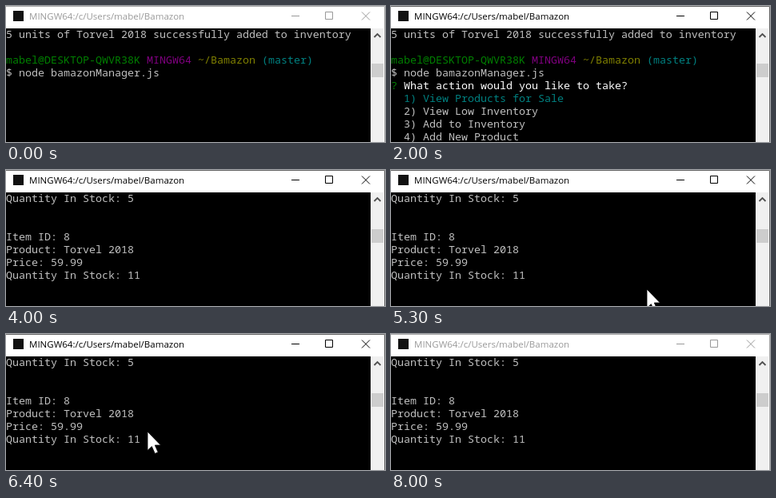
Recreate the animation shown at these times as an HTML page. Size 474x170 px, loop 8200 ms.

```html
<!DOCTYPE html>
<html lang="en">
<head>
<meta charset="utf-8">
<style>
  html, body { margin: 0; width: 100%; height: 100%; overflow: hidden; background: #000; }
  pre, svg { position: absolute; left: 0; top: 0; margin: 0; }
  pre { top: 27px; color: #c0c0c0; font: calc(40px / 3)/16px "Noto Sans Mono", monospace; }
  .green { color: #008000; }
  .purple { color: #800080; }
  .olive { color: #808000; }
  .cyan { color: #008080; }
  .white { color: #fff; }
</style>
</head>
<body>
<pre id="screen"></pre>
<svg width="474" height="170" viewBox="0 0 474 170">
  <rect id="caret" width="8" height="4" fill="#fff"/>
  <rect x="456" y="28" width="16" height="142" fill="#f0f0f0"/>
  <rect id="thumb" x="457" width="15" height="17" fill="#cdcdcd"/>
  <path d="M460.5 39l4-4 4 4" fill="none" stroke="#505050" stroke-width="1.8"/>
  <rect x="472" y="28" width="2" height="142" fill="#fff"/>
  <rect width="474" height="28" fill="#fff"/>
  <path id="border" d="M0 .5H473.5V170" fill="none"/>
  <rect x="9" y="6" width="13" height="13" fill="#111"/>
  <g id="title">
    <text x="29" y="17" font-family="Open Sans, sans-serif" font-size="11.5">MINGW64:/c/Users/mabel/Bamazon</text>
    <path d="M357 12.5h10M399.5 7.5h9v9h-9zM445 7.5l10 10M455 7.5l-10 10" fill="none" stroke="currentColor"/>
  </g>
  <path id="mouse" d="M0 0V23.5L5.3 18.6 9.3 27.5 13.2 25.8 9.3 17H16.5Z" fill="#fff" stroke="#000" stroke-width=".8"/>
</svg>
<script>
const LOOP = 8200;
const $ = id => document.getElementById(id);
const paint = (name, text) => `<span class="${name}">${text}</span>`;

const shell = [
  '5 units of Torvel 2018 successfully added to inventory',
  '',
  [paint('green', 'mabel@DESKTOP-QWVR38K'), paint('purple', 'MINGW64'),
   paint('olive', '~/Bamazon'), paint('cyan', '(master)')].join(' '),
  '$ node bamazonManager.js'
];
const question = paint('green', '?') + ' ' + paint('white', 'What action would you like to take?');
const choices = [
  paint('cyan', '  1) View Products for Sale'),
  '  2) View Low Inventory',
  '  3) Add to Inventory',
  '  4) Add New Product'
];
const products = [
  'Product: Lantern Nine Vale', 'Price: 59.99', 'Quantity In Stock: 5', '', '',
  'Item ID: 8', 'Product: Torvel 2018', 'Price: 59.99', 'Quantity In Stock: 11'
];

// Mouse visits as [time, x, y]; the pointer is hidden outside each visit.
const visits = [
  [[100, 306, 156], [200, 298, 136], [300, 300, 134], [400, 312, 152], [500, 320, 172]],
  [[5300, 320, 149], [5500, 225, 127], [5600, 188, 121], [5700, 169, 126], [5800, 169, 126],
   [6000, 148, 145], [6100, 152, 130], [6300, 172, 113], [6400, 177, 122], [6500, 171, 139],
   [6600, 156, 145], [6700, 149, 136], [6900, 164, 123], [7100, 184, 136], [7300, 176, 152],
   [7500, 170, 172]]
];

function mouseAt(t) {
  for (const visit of visits) {
    const i = visit.findIndex(([time]) => time > t);
    if (i < 1) continue;
    const [t0, x0, y0] = visit[i - 1], [t1, x1, y1] = visit[i];
    const k = (t - t0) / (t1 - t0);
    return [x0 + (x1 - x0) * k, y0 + (y1 - y0) * k];
  }
  return [0, 200];
}

function linesAt(t) {
  if (t < 1900) return shell;
  if (t < 2000) return [...shell, question];
  if (t < 3800) return [...shell, question, ...choices];
  return t < 4000 ? products : products.slice(2);
}

function caretAt(t) {
  if (t >= 200 && t < 400 || t >= 900 && t < 1400) return [192, 88];
  return t >= 1400 && t < 1900 ? [0, 104] : [0, -10];
}

const move = (id, [x, y]) => $(id).setAttribute('transform', `translate(${x} ${y})`);
let shown;

function draw(now) {
  const t = Math.floor(now % LOOP / 100) * 100;
  const active = t >= 200 && t < 8000;
  const html = linesAt(t).join('\n');
  if (html !== shown) $('screen').innerHTML = shown = html;
  $('title').style.color = $('title').style.fill = active ? '#000' : '#999';
  $('border').style.stroke = active ? '#666' : '#aaa';
  $('thumb').setAttribute('y', t < 3800 ? 72 : 74);
  move('caret', caretAt(t));
  move('mouse', mouseAt(t));
  requestAnimationFrame(() => draw(performance.now()));
}
draw(0);
</script>
</body>
</html>
```
